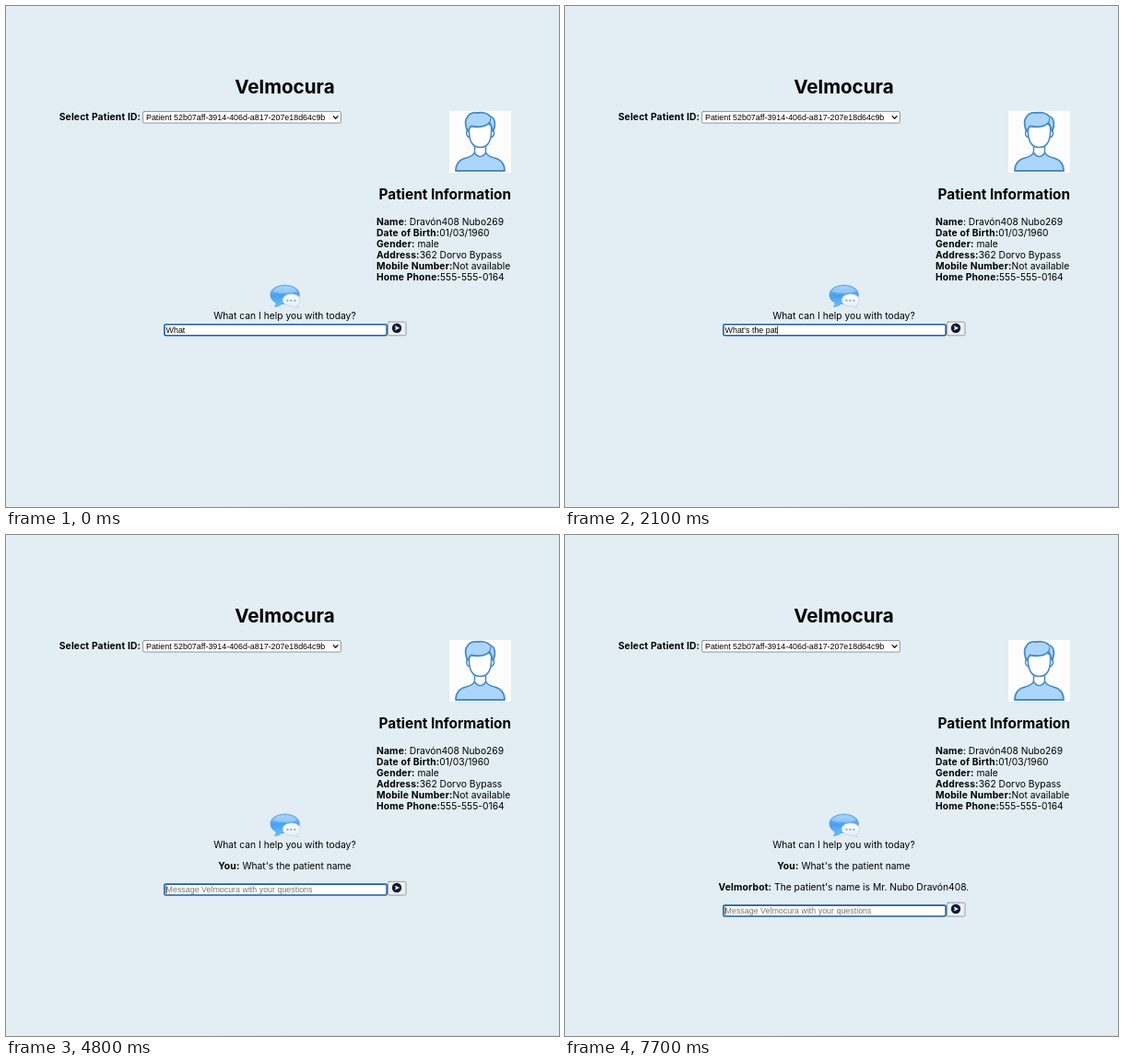
Write an HTML page with a canvas that moves like this. It is 600x544 px and loops after 8000 ms.

```html
<!DOCTYPE html>
<html lang="en">
<head>
<meta charset="utf-8">
<title>Patient chat</title>
<style>
  html, body { margin: 0; width: 100%; height: 100%; overflow: hidden; background: #e2eef4; }
  canvas { display: block; width: 600px; height: 544px; }
</style>
</head>
<body>
<canvas id="stage"></canvas>
<script>
const LOOP = 8000;
const W = 600, H = 544;
const canvas = document.getElementById('stage');
const ctx = canvas.getContext('2d');
const dpr = window.devicePixelRatio || 1;
canvas.width = W * dpr;
canvas.height = H * dpr;

const CENTER = 302.4;
const inter = (size, weight) => `${weight} ${size}px Inter, sans-serif`;
const PLAIN = inter(10.28, 400);
const BOLD = inter(10.28, 700);
const UI = '8.89px "Liberation Sans", Arial, sans-serif';

const APP = 'Velmocura';
const QUESTION = "What's the patient name";
const PLACEHOLDER = `Message ${APP} with your questions`;
const REPLY = " The patient's name is Mr. Nubo Dravón408.";
const INFO = [
  ['Name', ': Dravón408 Nubo269'],
  ['Date of Birth:', '01/03/1960'],
  ['Gender:', ' male'],
  ['Address:', '362 Dorvo Bypass'],
  ['Mobile Number:', 'Not available'],
  ['Home Phone:', '555-555-0164']
];

// Times of the keystrokes that follow the first four letters
const FIRST = 4;
const KEYS = [200, 300, 450, 600, 700, 850, 1700, 1800, 1950, 2080,
  2200, 2320, 2450, 4300, 4350, 4400, 4450, 4490, 4540];
const SPELL = 3380, SEND = 4600, ANSWER = 7000;

// Small bold text is set a little wider
function setFont(font) {
  ctx.font = font;
  ctx.letterSpacing = font === BOLD ? '0.17px' : '0px';
}

function text(str, x, y, font, align = 'left', color = '#000') {
  setFont(font);
  ctx.textAlign = align;
  ctx.fillStyle = color;
  ctx.fillText(str, x, y);
}

function width(str, font) {
  setFont(font);
  return ctx.measureText(str).width;
}

function pair(label, value, x, y, centered) {
  const lw = width(label, BOLD);
  if (centered) x -= (lw + width(value, PLAIN)) / 2;
  text(label, x, y, BOLD);
  text(value, x + lw, y, PLAIN);
}

function box(x, y, w, h, r, fill, stroke, line = 1) {
  ctx.beginPath();
  ctx.roundRect(x, y, w, h, r);
  ctx.fillStyle = fill;
  ctx.fill();
  if (!stroke) return;
  ctx.strokeStyle = stroke;
  ctx.lineWidth = line;
  ctx.stroke();
}

function shape(d, fill, stroke, line = 1) {
  const p = new Path2D(d);
  if (fill) { ctx.fillStyle = fill; ctx.fill(p); }
  if (stroke) { ctx.strokeStyle = stroke; ctx.lineWidth = line; ctx.stroke(p); }
}

function fade(x0, y0, x1, y1, ...colors) {
  const g = ctx.createLinearGradient(x0, y0, x1, y1);
  colors.forEach((c, i) => g.addColorStop(i / (colors.length - 1), c));
  return g;
}

function disc(x, y, r, fill) {
  ctx.beginPath();
  ctx.arc(x, y, r, 0, Math.PI * 2);
  ctx.fillStyle = fill;
  ctx.fill();
}

function avatar() {
  const line = '#4a8bc4', fill = '#acd5fb';
  box(481, 114, 67, 67, 0, '#fdfcfd');
  ctx.lineJoin = ctx.lineCap = 'round';
  // shoulders, neck, ears, face, hair, parting
  shape('M488 179 C488 170 493 166.5 499 165 C504 163.7 507 162.5 508.5 159 L520.5 159 C522 162.5 525 163.7 530 165 C536 166.5 541 170 541 179 Z', fill, line, 1.8);
  shape('M508.5 150 L508.5 159.5 Q514.5 167.5 520.5 159.5 L520.5 150 Z', '#fff', line, 1.5);
  shape('M502.5 134.5 C498.5 134 498.5 142 503.5 143 M526.5 134.5 C531 134 530.5 142 525.5 143', '#fff', line, 1.5);
  shape('M502.5 130 C501.5 145 505 153.5 514.5 153.5 C524 153.5 527.5 145 526.5 130 L518 124 L506 125 Z', '#fff', line, 1.6);
  shape('M501 136 C498.5 132 497.5 124 500.5 121 C502 117 507 115.5 512 116 C517 115 523 116.5 525 119.5 C530.5 121 532 128 528.5 136 C527.5 132 526.5 129.5 524.5 126.5 C521 131.5 512 132 504.5 130.5 C503 132 502.5 134 501 136 Z', fill, line, 1.8);
  shape('M524.5 126.5 Q526 124 525.6 122', null, line, 1.3);
}

function bubbles() {
  shape('M302.5 303.2 C312 303.2 318.3 307.5 318.3 313.4 C318.3 319.5 312 323.6 303 323.6 L299 323.4 C297 325.6 294.5 326.4 291.5 326.4 C293 325 293.4 323.5 292.8 322 C289 320 287 317 287 313.4 C287 307.5 293.5 303.2 302.5 303.2 Z',
    fade(0, 303, 0, 326, '#8cc8f8', '#4a9fee', '#6cc0fa'), '#4a90d4', 0.7);
  shape('M302.5 304.3 C309 304.3 314.5 306.6 315.5 310 C309 312.5 296 312.5 289.5 310 C291 306.6 296 304.3 302.5 304.3 Z', 'rgba(220,240,255,.38)');
  shape('M309.8 312.8 C315.3 312.8 319 315.6 319 319.3 C319 322.2 317.6 324.2 315.6 325 C315.7 326.2 316.4 327 317.6 327.6 C315 327.8 313 327.1 311.8 326 C304.8 326.4 300.3 323.5 300.3 319.4 C300.3 315.6 304 312.8 309.8 312.8 Z',
    fade(0, 312, 0, 328, '#ffffff', '#e2edf8'), '#b0cae3', 0.6);
  for (let i = 0; i < 3; i++) disc(305.4 + i * 4, 319.8, 1.1, '#7fa5d2');
}

function page() {
  ctx.fillStyle = '#e2eef4';
  ctx.fillRect(0, 0, W, H);
  ctx.fillStyle = fade(205, 0, 330, 0, 'rgba(190,200,206,0)', 'rgba(190,200,206,.4)');
  ctx.fillRect(205, 543, 395, 1);

  text(APP, CENTER, 94.5, inter(20.6, 700), 'center');
  text('Select Patient ID:', 146.2, 124, BOLD, 'right');
  box(148.6, 114.6, 214.8, 12.4, 1.5, '#fff', '#777b7e', 0.8);
  text('Patient 52b07aff-3914-406d-a817-207e18d64c9b', 152, 124, UI);
  shape('M355.2 119.6 L357.6 122.2 L360 119.6', null, '#111', 1.3);

  avatar();
  text('Patient Information', 548, 210, inter(15.35, 700), 'right');
  INFO.forEach(([k, v], i) => pair(k, v, 402, 237.6 + 12.1 * i));

  bubbles();
  text('What can I help you with today?', CENTER, 340.3, PLAIN, 'center');
}

function inputRow(t) {
  const sent = t >= SEND;
  const pressed = KEYS.filter(k => k <= t);
  const typed = sent ? '' : QUESTION.slice(0, FIRST + pressed.length);
  const lastKey = sent ? 4500 : pressed.length ? pressed[pressed.length - 1] : -700;
  const caretOn = (t - lastKey) % 1000 < 500;

  ctx.save();
  ctx.translate(0, t >= ANSWER ? 56.3 : sent ? 33.3 : 0);

  box(171.9, 345.8, 241.2, 11.9, 1.5, '#fff', '#215d9f', 1.6);
  if (sent) text(PLACEHOLDER, 173.6, 354.6, UI, 'left', '#757575');
  else text(typed, 173.6, 354.6, UI);

  if (t >= SPELL && t < KEYS[13]) {
    const x = 173.6 + width("What's the ", UI);
    ctx.setLineDash([1.3, 0.9]);
    ctx.lineCap = 'butt';
    shape(`M${x} 356.4 H${x + width('patien', UI)}`, null, '#77777b', 0.9);
    ctx.setLineDash([]);
  }
  if (caretOn) {
    ctx.fillStyle = '#111';
    ctx.fillRect(173.6 + width(typed, UI), 347.5, 0.8, 8.7);
  }

  box(414.5, 343, 19.5, 14.8, 1.5, '#efeff0', '#85888b', 0.8);
  disc(424, 349.7, 5.2, '#0c1a35');
  shape('M421.9 347.1 L427.1 349.7 L421.9 352.3 L422.9 349.7 Z', '#fff');
  ctx.restore();
}

function draw(t) {
  ctx.setTransform(dpr, 0, 0, dpr, 0, 0);
  page();
  if (t >= SEND) pair('You:', ' ' + QUESTION, CENTER, 363.2, true);
  if (t >= ANSWER) pair('Velmorbot:', REPLY, CENTER, 386, true);
  inputRow(t);
}

const start = performance.now();
function tick() {
  draw((performance.now() - start) % LOOP);
  requestAnimationFrame(tick);
}
tick();
</script>
</body>
</html>
```
